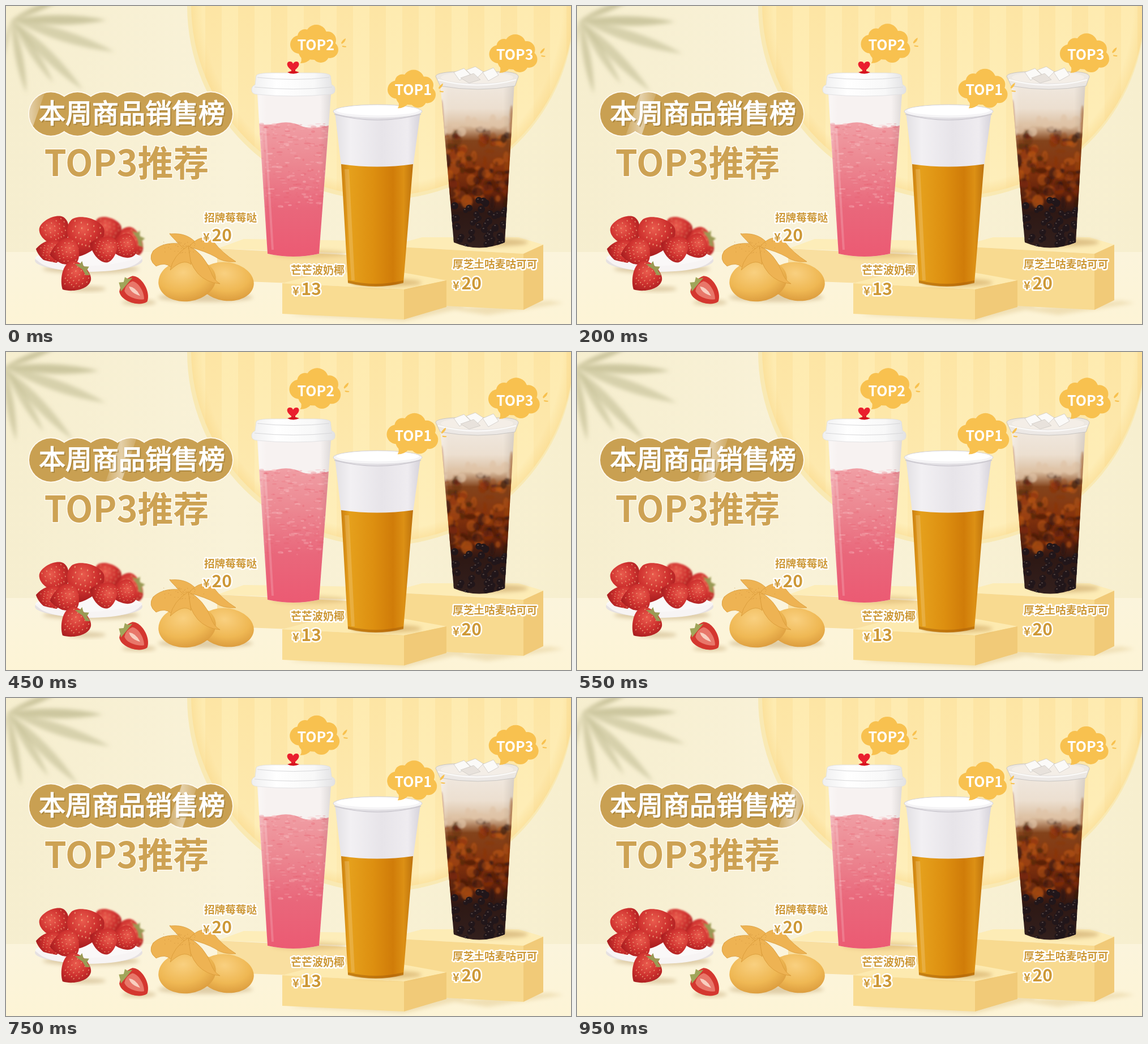
An HTML page that plays this animation: 998x561 px, repeating every 1 s.

```html
<!DOCTYPE html>
<html lang="zh">
<head>
<meta charset="utf-8">
<style>
html, body { margin: 0; width: 100%; height: 100%; overflow: hidden; background: #f8f0d4; }
svg { display: block; width: 100vw; height: 100vh; }
text { font-family: "Noto Sans CJK SC", "Noto Sans CJK", "Noto Sans", sans-serif; font-weight: 700; }
.label text { fill: #cd9836; stroke: #fff; stroke-width: 5; stroke-linejoin: round; paint-order: stroke; }
.title { font-size: 47px; font-weight: 400; stroke-width: 1.5; }
.top { fill: #fff; font-size: 25px; }
</style>
</head>
<body>
<svg viewBox="0 0 998 561" preserveAspectRatio="none">
<defs>
  <linearGradient id="wall"><stop stop-color="#f6eecf"/><stop offset=".4" stop-color="#f9f2d8"/><stop offset="1" stop-color="#f7efcf"/></linearGradient>
  <linearGradient id="floor" x2="0" y2="1"><stop stop-color="#fbf4dc"/><stop offset="1" stop-color="#fdf4d6"/></linearGradient>
  <pattern id="stripes" x="381" width="58" height="400" patternUnits="userSpaceOnUse">
    <path fill="#feebb0" d="M0 0h58v400H0z"/><path fill="#fde5a4" d="M29 0h29v400H29z"/>
  </pattern>
  <linearGradient id="disc" x2="0" y2="1"><stop offset=".5" stop-color="#fff4cb" stop-opacity="0"/><stop offset="1" stop-color="#fff4cb" stop-opacity=".4"/></linearGradient>
  <radialGradient id="rim"><stop offset=".94" stop-color="#f8d27c" stop-opacity="0"/><stop offset="1" stop-color="#f8d27c" stop-opacity=".4"/></radialGradient>
  <linearGradient id="pink" x2="0" y2="1"><stop stop-color="#f09ea4"/><stop offset=".3" stop-color="#ec8791"/><stop offset=".62" stop-color="#e9677b"/><stop offset="1" stop-color="#ec5972"/></linearGradient>
  <linearGradient id="foam"><stop stop-color="#e2e0e4"/><stop offset=".18" stop-color="#f2f0f3"/><stop offset=".55" stop-color="#e7e4e9"/><stop offset=".85" stop-color="#efecf0"/><stop offset="1" stop-color="#d6d3da"/></linearGradient>
  <linearGradient id="lid"><stop stop-color="#efeff0"/><stop offset=".3" stop-color="#fff"/><stop offset=".75" stop-color="#f8f8f8"/><stop offset="1" stop-color="#e1e1e3"/></linearGradient>
  <linearGradient id="tea"><stop stop-color="#cc8010"/><stop offset=".12" stop-color="#e5a01c"/><stop offset=".45" stop-color="#dd8f10"/><stop offset=".72" stop-color="#d07c09"/><stop offset=".87" stop-color="#dc9014"/><stop offset="1" stop-color="#bd720d"/></linearGradient>
  <linearGradient id="cocoa" x2="0" y2="1"><stop stop-color="#f0e8df"/><stop offset=".15" stop-color="#ecdfd0"/><stop offset=".25" stop-color="#dcc0a2"/><stop offset=".34" stop-color="#83431b"/><stop offset=".5" stop-color="#86340d"/><stop offset=".66" stop-color="#60210c"/><stop offset=".76" stop-color="#2e1814"/><stop offset="1" stop-color="#33211f"/></linearGradient>
  <linearGradient id="shade"><stop stop-color="#fff" stop-opacity=".35"/><stop offset=".12" stop-color="#fff" stop-opacity="0"/><stop offset=".85" stop-opacity="0"/><stop offset="1" stop-opacity=".1"/></linearGradient>
  <linearGradient id="glint"><stop stop-color="#fff" stop-opacity=".1"/><stop offset=".5" stop-color="#fff" stop-opacity=".5"/><stop offset="1" stop-color="#fff" stop-opacity=".1"/></linearGradient>
  <radialGradient id="berry" cx=".4" cy=".3" r=".75"><stop stop-color="#ea5c4e"/><stop offset=".5" stop-color="#cf322f"/><stop offset="1" stop-color="#a0191c"/></radialGradient>
  <radialGradient id="mango" cx=".45" cy=".3" r=".75"><stop stop-color="#f9d080"/><stop offset=".6" stop-color="#efb854"/><stop offset="1" stop-color="#d9983a"/></radialGradient>
  <filter id="soft" x="-20%" y="-40%" width="140%" height="180%"><feGaussianBlur stdDeviation="3.5"/></filter>
  <filter id="soft2" x="-20%" y="-20%" width="140%" height="140%"><feGaussianBlur stdDeviation="1.5"/></filter>
  <clipPath id="cup2"><path d="M444 156H574L553 437Q508 447 462 437Z"/></clipPath>
  <clipPath id="cup3"><path d="M767 136H898L881 417Q836 436 791 417Z"/></clipPath>
  <clipPath id="badgeClip"></clipPath>
  <g id="cloud" fill="#f8c14f">
    <ellipse cx="545" cy="68" rx="35" ry="27"/><circle cx="518" cy="68" r="16"/><circle cx="528" cy="54" r="13"/>
    <circle cx="548" cy="52" r="19"/><circle cx="568" cy="60" r="15"/><circle cx="572" cy="77" r="15"/>
    <circle cx="556" cy="85" r="15"/><circle cx="531" cy="81" r="14"/>
    <path d="M517 82Q525 93 520 101Q532 101 539 92ZM592 65Q595 59 600 57Q600 63 593 67ZM594 70L601 71Q602 74 594 72Z"/>
  </g>
</defs>

<path fill="url(#wall)" d="M0 0H998V561H0z"/>
<g id="leaf" fill="#9f9c6a" filter="url(#soft)"></g>
<circle cx="662" cy="0" r="342" fill="#f9e9b3"/>
<circle cx="665" cy="-3" r="338" fill="url(#stripes)"/>
<circle cx="665" cy="-3" r="338" fill="url(#disc)"/>
<circle cx="665" cy="-3" r="338" fill="url(#rim)"/>
<path fill="url(#floor)" d="M0 434H998V561H0z"/>

<!-- plinths -->
<g fill="#d7b873" opacity=".35" filter="url(#soft)">
  <path d="M500 545L703 556L810 532L790 500Z"/><path d="M780 534L960 520L985 524L850 545Z"/>
</g>
<path fill="#fdedb9" d="M373 428L420 411L625 414L640 440L601 436Z"/>
<path fill="#f9dfa0" d="M373 428L640 441V494L373 484Z"/>
<path fill="#fdecb6" d="M676 424L735 408L905 408L949 421L914 437Z"/>
<path fill="#f8da90" d="M676 424L914 437V536L676 524Z"/>
<path fill="#f1ca78" d="M914 437L949 421V519L914 536Z"/>
<path fill="#fdeab0" d="M488 489L560 470H700L778 484L703 500Z"/>
<path fill="#f9dc92" d="M488 489L703 500V553L488 543Z"/>
<path fill="#f1ca78" d="M703 500L778 484V531L703 553Z"/>

<!-- strawberry cup -->
<ellipse cx="535" cy="437" rx="66" ry="7" fill="#c89b54" opacity=".35" filter="url(#soft)"/>
<g clip-path="url(#cup2)">
  <path fill="#f7f2f1" d="M440 150H580V450H440z"/>
  <path fill="url(#pink)" d="M440 207Q460 212 480 207T520 211T580 208V450H440z"/>
  <g id="slush"></g>
  <path fill="url(#shade)" d="M446 156H574V450H446z"/>
  <path d="M458 215L471 430" stroke="#fff" stroke-width="4" opacity=".18"/>
</g>
<path fill="url(#lid)" stroke="#dedee0" stroke-width=".8" d="M442 123Q444 118 470 118H545Q571 118 573 123L575 139Q582 141 581 149Q581 156 570 156Q508 162 444 156Q434 155 434 149Q433 142 440 139Z"/>
<path fill="none" stroke="#d8d8da" d="M444 126Q508 133 571 126M439 143Q508 150 576 143"/>
<path fill="#d6141f" d="M497 117Q507 112 518 117Q507 122 497 117M504 106H511V117H504Z"/>
<path fill="#ea1f2d" d="M507 115C492 106 496 97 502 98Q506 98 507 102Q509 98 513 98C519 98 521 107 507 115Z"/>

<!-- mango cup -->
<ellipse cx="672" cy="488" rx="62" ry="7" fill="#b98438" opacity=".4" filter="url(#soft)"/>
<path fill="url(#foam)" d="M581 188H732L718 290H593Z"/>
<path fill="url(#tea)" d="M592 279Q656 288 719 279L702 488Q653 501 604 488Z"/>
<path fill="#fff" opacity=".16" d="M598 288H606L616 484H610Z"/>
<path fill="#9d5808" opacity=".45" d="M604 484Q653 496 702 484V489Q653 501 604 489Z"/>
<ellipse cx="656.500" cy="186" rx="78.500" ry="12" fill="#f5f4f6" stroke="#d4d2d7"/>
<ellipse cx="656.500" cy="184" rx="73" ry="9" fill="#fff"/>
<path fill="none" stroke="#cbc8cf" stroke-width="1.500" d="M580 191Q656 211 733 191"/>

<!-- cocoa cup -->
<ellipse cx="862" cy="417" rx="60" ry="7" fill="#b08141" opacity=".4" filter="url(#soft)"/>
<g clip-path="url(#cup3)">
  <path fill="url(#cocoa)" d="M760 136H905V436H760z"/>
  <g id="syrup" filter="url(#soft2)"></g>
  <g id="pearls"></g>
  <path fill="url(#shade)" d="M766 136H898V436H766z"/>
</g>
<path fill="#ece9e6" fill-opacity=".92" stroke="#c9c5c1" d="M759 124Q760 118 790 116H878Q905 117 905 125L899 141Q834 153 767 141Z"/>
<ellipse cx="832" cy="126" rx="64" ry="10" fill="#f4eee7"/>
<g fill="#fbfaf8" stroke="#cfcac5" stroke-width=".8">
  <path d="M791 117L809 110L820 121L801 131ZM813 113L829 107L843 116L830 129ZM842 117L861 109L870 122L852 132Z"/>
  <path d="M803 127L826 119L838 130L818 136Z" fill="#e8e2dc"/>
</g>
<path fill="none" stroke="#fff" stroke-width="2" opacity=".8" d="M763 130Q832 149 901 130"/>

<!-- fruit -->
<g id="fruit"></g>

<!-- headings -->
<g id="badge"></g>
<g clip-path="url(#badgeClip)"><path id="shine" fill="url(#glint)" d="M0 -40H28L0 40H-28Z"/></g>
<text class="title" x="60" y="208" fill="#91702c" stroke="#91702c" opacity=".5">本周商品销售榜</text>
<text class="title" x="58" y="206" fill="#fff" stroke="#fff">本周商品销售榜</text>
<text x="67.500" y="300" font-size="63" fill="#cda253" stroke="#fffaf0" stroke-width="3" paint-order="stroke">TOP3推荐</text>

<g class="label" id="labels"></g>
<g id="bubbles"></g>
</svg>

<script>
const $ = id => document.getElementById(id);
let seed = 7;
const rnd = (a, b) => {
  seed = (seed * 16807) % 2147483647;
  return a + (b - a) * seed / 2147483647;
};
const repeat = (n, make) => Array.from({ length: n }, (_, i) => make(i)).join('');
const ellipse = (x, y, rx, ry, fill, more = '') =>
  `<ellipse cx="${x}" cy="${y}" rx="${rx}" ry="${ry}" fill="${fill}" ${more}/>`;

// Palm shadow: blades fan out from the stem, given as tip x, tip y, opacity
$('leaf').innerHTML = [
  [108, -18, .5], [178, 25, .48], [192, 81, .36], [136, 148, .36], [84, 136, .36], [36, 154, .4], [-16, 118, .3]
].map(([x, y, o]) => {
  const dx = x - 10, dy = y - 24, mx = 10 + dx * .5, my = 24 + dy * .5, k = .1;
  return `<path opacity="${o}" d="M10 24Q${mx - dy * k} ${my + dx * k} ${x} ${y}Q${mx + dy * k} ${my - dx * k} 10 24"/>`;
}).join('');

// Drink textures
$('slush').innerHTML = repeat(260, () => {
  const y = 208 + 150 * rnd(0, 1) ** 1.3;
  return ellipse(rnd(446, 572), y, rnd(1, 6), rnd(.6, 2.2), rnd(0, 1) < .6 ? '#f9c3c6' : '#e5606f', `opacity="${rnd(.15, .4)}"`);
});
$('syrup').innerHTML = repeat(110, () => {
  const y = rnd(215, 350), colors = ['#40170a', '#bd5712', '#8d300a', '#28130e'];
  return ellipse(rnd(768, 895), y, rnd(3, 11), rnd(3, 12), colors[Math.floor(rnd(0, 4))], `opacity="${rnd(.25, .65)}"`);
}) + repeat(12, i => ellipse(772 + i * 11, rnd(200, 222), rnd(5, 9), rnd(5, 12), '#dfc3a6', 'opacity=".7"')) +
  ellipse(769, 215, 4, 50, '#a8551c', 'opacity=".7"') + ellipse(893, 220, 4, 45, '#a8551c', 'opacity=".5"');
$('pearls').innerHTML = repeat(60, () => {
  const x = rnd(780, 890), y = rnd(342, 424), r = rnd(4, 6.5);
  return ellipse(x, y, r, r, '#21161a') + ellipse(x - 1.5, y - 2, 1.6, 1, '#76655f', 'opacity=".65"');
});

// Fruit
const calyx = '<path fill="#9a9a54" d="M0 -20L-18 -17L-11 -24L-12 -31L-3 -26L5 -33L7 -25L18 -23L12 -17Z"/>';
const berry = (x, y, s, turn, leaves = '') => `<g transform="translate(${x} ${y}) rotate(${turn}) scale(${s})">
  <path fill="url(#berry)" d="M0 34C-16 26 -36 0 -26 -17C-17 -30 17 -30 26 -17C36 0 16 26 0 34Z"/>` +
  repeat(26, i => {
    const v = -17 + Math.floor(i / 5) * 8, w = 23 - Math.max(0, v + 3) * .55;
    return ellipse((i % 5 - 2) / 2.3 * w + (Math.floor(i / 5) % 2) * 3, v, 1, 1.5, '#f0b184', 'opacity=".7"');
  }) + leaves + '</g>';
const shadow = (x, y, rx, ry) => ellipse(x, y, rx, ry, '#a9854b', 'opacity=".35" filter="url(#soft)"');
const petal = d => `<path fill="#eeb353" stroke="#d99a38" stroke-width=".8" d="${d}"/>`;

$('fruit').innerHTML =
  shadow(150, 464, 85, 8) + shadow(142, 499, 34, 5) + shadow(235, 523, 30, 5) + shadow(352, 514, 84, 8) +
  `<g filter="url(#soft2)">${berry(215, 419, .95, 65, calyx)}${berry(178, 396, .85, 20)}</g>` +
  ellipse(146, 449, 95, 19, '#e6e1e2') + ellipse(146, 445, 94, 16, '#faf8f8') +
  berry(87, 397, .92, -25) + berry(139, 404, 1.15, 15) + berry(210, 424, .75, 75) + berry(174, 428, .8, 110) +
  berry(78, 433, .75, 100) + berry(106, 434, .85, 80) +
  '<path fill="#f7f4f4" d="M52 444Q147 474 241 442Q233 468 147 469Q64 468 52 444Z"/>' +
  berry(122, 478, .92, 45, calyx) +
  `<g transform="translate(227 503) rotate(-50)">
    <path fill="#d4372f" d="M0 29C-17 24 -29 -7 -18 -20Q0 -30 18 -20C29 -7 17 24 0 29Z"/>
    <path fill="#e8776a" d="M0 22C-9 15 -17 -4 -11 -14Q0 -20 11 -14C17 -4 9 15 0 22Z"/>
    <path fill="#f8cfc0" d="M0 13Q-7 -3 0 -13Q7 -3 0 13Z"/>
    <path fill="#a0a55a" d="M-16 -18L-11 -24L-6 -31L0 -25L8 -29L9 -23L16 -18Z"/></g>` +
  ellipse(389, 486, 49, 34, 'url(#mango)', 'transform="rotate(8 389 486)"') +
  ellipse(320, 484, 51, 37, 'url(#mango)', 'transform="rotate(-8 320 484)"') +
  petal('M322 422Q282 412 260 432Q250 447 265 459Q281 451 292 461Q301 441 322 422Z') +
  petal('M314 428Q282 397 291 402Q323 399 340 423Z') +
  petal('M323 425Q345 399 366 415Q382 436 406 451Q384 453 369 442Q353 433 323 425Z') +
  petal('M322 423Q349 436 362 469Q367 484 378 490Q354 488 339 472Q322 453 322 423Z') +
  petal('M322 423Q295 440 290 466Q313 444 327 456Z') +
  repeat(45, () => ellipse(rnd(278, 350), rnd(415, 436), .7, .6, '#c68530', 'opacity=".5"'));

// Scalloped badge
const discs = (r, fill) => repeat(7, i => ellipse(79.2 + i * 47.1, 190.5, r, r, fill));
$('badge').innerHTML = discs(40, '#fffaf0') + discs(38.2, '#c9a052');
$('badgeClip').innerHTML = discs(38.2, '#000');

// Product labels: name, size, x, baseline, price, price x, price baseline
$('labels').innerHTML = [
  ['招牌莓莓哒', 18.6, 350, 380, 20, 348, 415],
  ['芒芒波奶椰', 19, 503, 473, 13, 506, 510],
  ['厚芝土咕麦咕可可', 18.7, 789, 462, 20, 789, 500]
].map(([name, size, x, y, price, px, py]) =>
  `<text x="${x}" y="${y}" font-size="${size}">${name}</text>
   <text x="${px}" y="${py}" font-size="20">¥</text>
   <text x="${px + 15.5}" y="${py}" font-size="30">${price}</text>`).join('');

const spots = [[0, 0, 'TOP2'], [172, 79.5, 'TOP1'], [351.5, 17, 'TOP3']];
$('bubbles').innerHTML = spots.map(([x, y, word]) =>
  `<g transform="translate(${x} ${y})"><use href="#cloud"/><text class="top" x="514.5" y="77.500">${word}</text></g>`).join('');
const clouds = document.querySelectorAll('use');

function draw(now) {
  const t = now % 1000;
  const p = (1 - Math.cos(t / 500 * Math.PI)) / 2;
  const s = 1 + .07 * p;
  for (const c of clouds) c.setAttribute('transform', `translate(525 101) scale(${s}) translate(-525 -101)`);
  $('leaf').setAttribute('transform', `translate(${-14 * p} ${3 * p}) rotate(${2 * p} 20 30)`);
  $('shine').setAttribute('transform', `translate(${41 + .36 * t} 190.5)`);
  requestAnimationFrame(draw);
}
draw(0);
</script>
</body>
</html>
```
